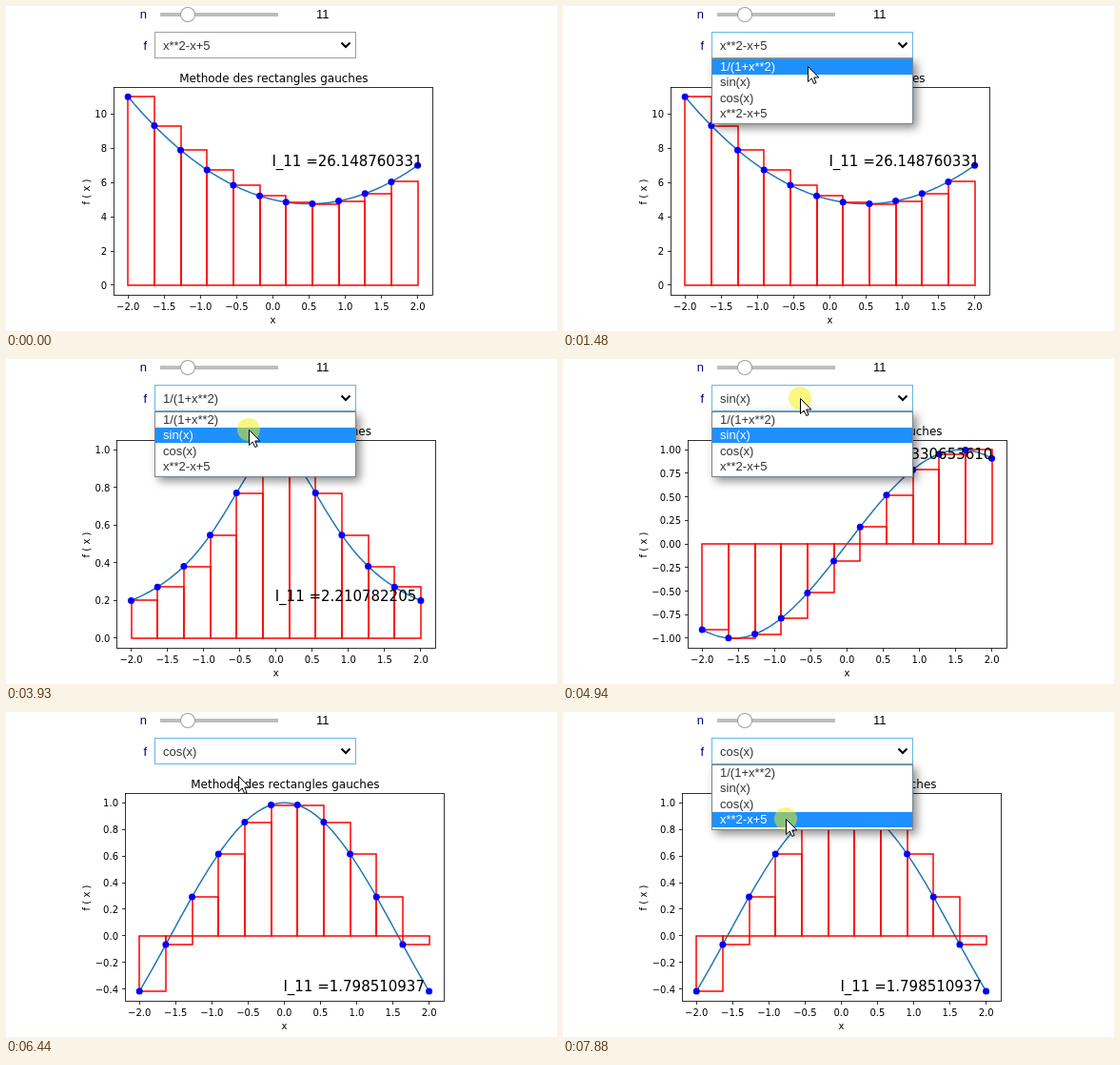
These frames come from a looping animation (579 px wide and 341 px high, 8000 ms). An HTML page with a canvas:

```html
<!DOCTYPE html>
<html lang="fr">
<head>
<meta charset="utf-8">
<title>Methode des rectangles gauches</title>
<style>
html, body { margin: 0; width: 100%; height: 100%; overflow: hidden; background: #fff; }
canvas { display: block; }
</style>
</head>
<body>
<canvas id="stage" width="579" height="341"></canvas>
<script>
const ctx = document.getElementById('stage').getContext('2d');
const LOOP = 8000, STEP = 70, N = 11, A = -2, B = 2;
const SANS = '"Liberation Sans", Arial, sans-serif';
const DEJAVU = '"DejaVu Sans", sans-serif';

// left: axes edge, ticks: [first, last, step, decimals] in multiples of step
const FUNCS = [
  { label: '1/(1+x**2)', f: x => 1 / (1 + x * x), left: 116.3, ticks: [0, 5, 0.2, 1] },
  { label: 'sin(x)', f: Math.sin, left: 131, ticks: [-4, 4, 0.25, 2] },
  { label: 'cos(x)', f: Math.cos, left: 125, ticks: [-2, 5, 0.2, 1] },
  { label: 'x**2-x+5', f: x => x * x - x + 5, left: 113, ticks: [0, 5, 2, 0] }
];
const AXES = { top: 85.4, width: 334.8, height: 217.44 };
const MENU = { x: 156.5, y: 55.5, w: 211, h: 68, row: 16.6 };

// Each value holds from its time on.
const plotted = [[0, 3], [2430, 0], [4400, 1], [6300, 2]];
const selected = [[0, 3], [2030, 0], [4200, 1], [6170, 2]];
const opened = [[1010, 2030], [2980, 4200], [4940, 6170], [6990, LOOP]];
const pressed = [[1010, 1210], [1830, 2030], [2980, 3180], [3930, 4200],
                 [4940, 5140], [5900, 6170], [6990, 7190], [7880, LOOP]];
const CURSOR_START = { x: 493, y: 321 };
const moves = [
  { from: 190, to: 750, x: 270, y: 48 },
  { from: 1410, to: 1620, x: 255, y: 65, power: 3 },
  { from: 2500, to: 2780, x: 256, y: 47 },
  { from: 3380, to: 3590, x: 255, y: 74 },
  { from: 4470, to: 4680, x: 249, y: 41 },
  { from: 5340, to: 5760, x: 245, y: 95 },
  { from: 6370, to: 6720, x: 244, y: 44 },
  { from: 7380, to: 7660, x: 234, y: 112 }
];

const valueAt = (track, t) => track.filter(([start]) => start <= t).pop()[1];
const spanAt = (spans, t) => spans.find(([a, b]) => t >= a && t < b);

function cursorAt(t) {
  let { x, y } = CURSOR_START;
  for (const m of moves) {
    if (t < m.from) break;
    const count = Math.round((m.to - m.from) / STEP) + 1;
    const k = Math.min(1, (Math.floor((t - m.from) / STEP) + 1) / count);
    const e = 1 - (1 - k) ** (m.power || 2);
    x += (m.x - x) * e;
    y += (m.y - y) * e;
  }
  return { x: Math.round(x), y: Math.round(y) };
}

function hoveredRow(t, start) {
  let row = valueAt(selected, start);
  for (let s = start; s <= t; s += 10) {
    const { y } = cursorAt(s);
    if (y >= MENU.y) row = Math.min(3, Math.floor((y - MENU.y) / MENU.row));
  }
  return row;
}

function text(str, x, y, font, color = '#000', align = 'left') {
  ctx.font = font;
  ctx.fillStyle = color;
  ctx.textAlign = align;
  ctx.fillText(str, x, y);
}

function trace(points, closed) {
  ctx.beginPath();
  points.forEach(([x, y]) => ctx.lineTo(x, y));
  if (closed) ctx.closePath();
}

function strokeLine(points, color, width, closed) {
  trace(points, closed);
  ctx.strokeStyle = color;
  ctx.lineWidth = width;
  ctx.stroke();
}

function disc(x, y, r, color) {
  ctx.beginPath();
  ctx.arc(x, y, r, 0, 2 * Math.PI);
  ctx.fillStyle = color;
  ctx.fill();
}

function drawPlot({ f, left, ticks }) {
  const { top, width, height } = AXES;
  const bottom = top + height, small = '10px ' + DEJAVU;
  const curve = Array.from({ length: 201 }, (_, i) => A + (B - A) * i / 200);
  const values = curve.map(f);
  const lo = Math.min(0, ...values), hi = Math.max(0, ...values);
  const px = x => left + width * ((x - A) / (B - A) / 1.1 + 0.5 / 11);
  const py = y => bottom - height * ((y - lo) / (hi - lo) / 1.1 + 0.5 / 11);
  const crisp = v => Math.round(v) + 0.5;
  const number = (v, d) => v.toFixed(d).replace('-', '\u2212');

  const h = (B - A) / N;
  let sum = 0;
  strokeLine(curve.map((x, i) => [px(x), py(values[i])]), '#1f77b4', 1.5);
  for (let i = 0; i < N; i++) {
    const x = A + i * h;
    const [x0, x1, y0, y1] = [px(x), px(x + h), py(0), py(f(x))].map(Math.round);
    sum += h * f(x);
    strokeLine([[x0, y0], [x0, y1], [x1, y1], [x1, y0]], '#f00', 1.5, true);
  }
  for (let i = 0; i <= N; i++) disc(px(A + i * h), py(f(A + i * h)), 3.5, '#00f');

  const l = crisp(left), b = crisp(bottom);
  for (let i = -4; i <= 4; i++) {
    const x = px(i / 2);
    strokeLine([[crisp(x - 0.5), b], [crisp(x - 0.5), b + 3.5]], '#000', 0.8);
    text(number(i / 2, 1), x, 319, small, '#000', 'center');
  }
  const [first, last, step, decimals] = ticks;
  for (let i = first; i <= last; i++) {
    const y = py(i * step);
    strokeLine([[l - 3.5, crisp(y - 0.5)], [l, crisp(y - 0.5)]], '#000', 0.8);
    text(number(i * step, decimals), left - 7, y + 4, small, '#000', 'right');
  }
  ctx.strokeStyle = '#000';
  ctx.lineWidth = 0.8;
  ctx.strokeRect(l, crisp(top), crisp(left + width) - l, b - crisp(top));

  const middle = left + width / 2;
  text('x', middle, 333, small, '#000', 'center');
  text('Methode des rectangles gauches', middle + 1, 80, '12px ' + DEJAVU, '#000', 'center');
  text(`I_${N} =${sum.toFixed(9)}`, px(0) - 1, py(f(B)) + 0.5, '15px ' + DEJAVU);
  ctx.save();
  ctx.translate(88, 195);
  ctx.rotate(-Math.PI / 2);
  text('f ( x )', 0, 0, small, '#000', 'center');
  ctx.restore();
}

function drawControls(t) {
  const font = '13px ' + SANS;
  text('n', 148, 13, font, '#000080', 'right');
  text('f', 148, 46, font, '#000080', 'right');
  text(String(N), 326, 13, font);
  ctx.fillStyle = '#bdbdbd';
  ctx.fillRect(162, 7, 124, 4);
  disc(191, 9, 8, '#9e9e9e');
  disc(191, 9, 7, '#fff');

  ctx.strokeStyle = t < 1010 ? '#9e9e9e' : '#64b5e6';
  ctx.lineWidth = 1;
  ctx.strokeRect(156.5, 27.5, 211, 27);
  text(FUNCS[valueAt(selected, t)].label, 165, 46, font, '#333');
  strokeLine([[352.5, 38.5], [357, 43], [361.5, 38.5]], '#000', 2);
}

function drawMenu(active) {
  const { x, y, w, h, row } = MENU;
  ctx.save();
  ctx.shadowColor = 'rgba(0,0,0,.45)';
  ctx.shadowBlur = 9;
  ctx.shadowOffsetX = ctx.shadowOffsetY = 4;
  ctx.fillStyle = '#fff';
  ctx.fillRect(x - 0.5, y - 0.5, w + 1, h + 1);
  ctx.restore();
  FUNCS.forEach(({ label }, i) => {
    const top = Math.round(y + i * row);
    if (i === active) {
      ctx.fillStyle = '#1e90ff';
      ctx.fillRect(x, top, w, 16);
    }
    text(label, 165, top + 12, '13px ' + SANS, i === active ? '#fff' : '#333');
  });
  ctx.strokeStyle = '#7b848c';
  ctx.lineWidth = 1;
  ctx.strokeRect(x, y, w, h);
}

function drawCursor({ x, y }, down) {
  if (down) disc(x, y, 12, 'rgba(245,240,0,.5)');
  ctx.save();
  ctx.translate(x + 0.5, y + 0.5);
  trace([[0, 0], [0, 16], [3.7, 12.5], [6.2, 18], [8.6, 17], [6.2, 11.5], [11.3, 11.5]], true);
  ctx.fillStyle = '#fff';
  ctx.fill();
  ctx.strokeStyle = '#000';
  ctx.lineWidth = 1;
  ctx.stroke();
  ctx.restore();
}

function draw(t) {
  ctx.fillStyle = '#fff';
  ctx.fillRect(0, 0, 579, 341);
  drawPlot(FUNCS[valueAt(plotted, t)]);
  drawControls(t);
  const open = spanAt(opened, t);
  if (open) drawMenu(hoveredRow(t, open[0]));
  if (t >= moves[0].from) drawCursor(cursorAt(t), spanAt(pressed, t));
}

const begin = performance.now();
function frame() {
  draw((performance.now() - begin) % LOOP);
  requestAnimationFrame(frame);
}
frame();
</script>
</body>
</html>
```
